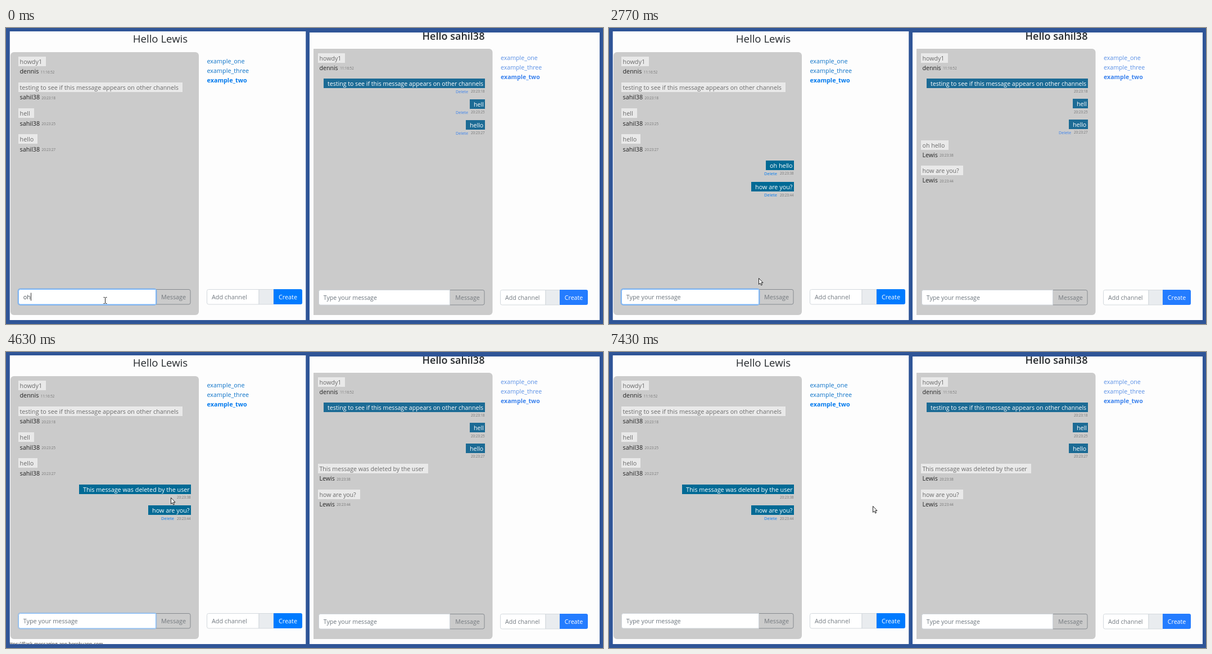
These frames come from a looping animation (1062x527 px, 7560 ms). An HTML page with a canvas:

```html
<!DOCTYPE html>
<html lang="en">
<head>
<meta charset="utf-8">
<title>Two chat windows</title>
<style>
html, body { margin: 0; width: 100%; height: 100%; overflow: hidden; background: #2f5597; }
canvas { display: block; }
</style>
</head>
<body>
<canvas id="stage" width="1062" height="527"></canvas>
<script>
const ctx = document.getElementById('stage').getContext('2d');
const LOOP = 7560, BLINK = 210;
const SENT_1 = 620, SENT_2 = 2560, BLUR = 4540, DELETED = 4600;
const LEFT_USER = 'Lewis', RIGHT_USER = 'sahil38';
const REMOVED = 'This message was deleted by the user';

const left = {
  user: LEFT_USER, page: [6.5, 6, 527, 514], panel: [8, 43, 335, 468], corners: 6,
  title: [274.5, 25.5, 18.6, 500], size: 10.8, small: 7.6,
  x: 22, right: 329, top: 59.5, steps: [46.3, 38.2, 37.6], nameDy: 17.4, metaDy: 14.3,
  own: '#006a95', link: '#0b72c8', strong: '#0079ee',
  links: [357.5, 59, 17.1], input: [22, 267], inputY: 465, channel: [357, 450, 476, 527],
};
const right = {
  user: RIGHT_USER, page: [540, 8, 516, 512], panel: [547, 37, 318.5, 474], corners: [0, 6, 6, 0],
  title: [796, 21, 18, 600], size: 10.6, small: 7.3,
  x: 555, right: 852, top: 53.5, steps: [45.5, 37, 36.4], nameDy: 17, metaDy: 14,
  own: '#1c6b95', link: '#5a90e6', strong: '#3a82ee',
  links: [880, 53, 16.8], input: [556, 790], inputY: 466, channel: [879, 960, 985, 1035],
};

// Each key press: [time, field content]
const keys = [[-100, 'oh']];
function type(start, step, added, before) {
  [...added].forEach((_, i) => keys.push([start + i * step, before + added.slice(0, i + 1)]));
}
type(40, 80, ' hello', 'oh');
keys.push([SENT_1, '']);
type(1000, 80, 'how are', '');
type(1700, 90, ' you', 'how are');
keys.push([2340, 'how are you?'], [SENT_2, '']);

// Pointer stops: [time, x, y]
const stops = [[2650, 176, 485], [3170, 830, 192], [3400, 815, 186], [4000, 800, 190],
  [4450, 287, 256], [4630, 293, 259], [5300, 293, 259], [6070, 544, 210], [6600, 469, 274]];

function text(str, x, y, size, color, weight = 400, align = 'left') {
  ctx.font = `${weight} ${size}px "Open Sans", "Noto Sans", sans-serif`;
  ctx.textAlign = align;
  ctx.fillStyle = color;
  ctx.fillText(str, x, y);
  return ctx.measureText(str).width;
}

function box(x, y, w, h, fill, stroke, radius = 0, lineWidth = 1) {
  ctx.beginPath();
  ctx.roundRect(x, y, w, h, radius);
  if (fill) { ctx.fillStyle = fill; ctx.fill(); }
  if (stroke) { ctx.strokeStyle = stroke; ctx.lineWidth = lineWidth; ctx.stroke(); }
}

function bubble(v, message, center, own) {
  ctx.font = `400 ${v.size}px "Open Sans", "Noto Sans", sans-serif`;
  const w = Math.round(ctx.measureText(message).width + 9.5);
  const x = own ? v.right - w : v.x, y = Math.floor(center - 8.5);
  box(x, y, w, 17, own ? v.own : '#e9e9e9');
  text(message, x + (own ? 7 : 2.5), y + 12.5, v.size, own ? '#fff' : '#6a6a6a');
}

function messages(t) {
  const list = [
    ['dennis', 'howdy1', '11:16:52'],
    [RIGHT_USER, 'testing to see if this message appears on other channels', '20:23:18', SENT_1 + 60],
    [RIGHT_USER, 'hell', '20:23:25', SENT_2 + 60],
    [RIGHT_USER, 'hello', '20:23:27', DELETED],
  ];
  if (t >= SENT_1) list.push([LEFT_USER, t < DELETED ? 'oh hello' : REMOVED, '20:23:38', DELETED]);
  if (t >= SENT_2) list.push([LEFT_USER, 'how are you?', '20:23:44', Infinity]);
  return list;
}

function chat(v, t) {
  let y = v.top;
  for (const [user, message, time, lockedAt] of messages(t)) {
    const own = user === v.user;
    bubble(v, message, y, own);
    if (own) {
      const base = y + v.metaDy + 2.4, open = t < lockedAt;
      text(time, v.right - .5, base, 6.2, '#777', 400, 'right');
      if (open) text('Delete', v.right - 30, base + .3, v.small, v.strong, 400, 'right');
      y += v.steps[open ? 1 : 2];
    } else {
      const w = text(user, v.x + 2.5, y + v.nameDy + 4, v.size, '#222');
      text(time, v.x + w + 6, y + v.nameDy + 3.6, 6.2, '#777');
      y += v.steps[0];
    }
  }
}

function form(v, t) {
  const [x0, x1] = v.input, y = v.inputY + .5, base = y + 17.5, h = 26.5;
  const focus = v === left ? Math.max(0, Math.min(1, 1 - (t - BLUR) / 150)) : 0;
  box(x1 - .5, y, v.right - x1 - .5, h, null, '#858a8f', [0, 3, 3, 0]);
  text('Message', (x1 + v.right) / 2, base, v.size, '#73787d', 400, 'center');
  if (focus) box(x0 - .5, y - 1, x1 - x0 + 1, h + 2, null, `rgba(110,170,240,${.75 * focus})`, 4, 2);
  box(x0 + .5, y, x1 - x0 - 1, h, '#fff', focus ? '#80bdff' : '#ced4da', [3, 0, 0, 3]);

  const [pressed, value] = v === left ? keys.findLast(k => k[0] <= t) : [0, ''];
  const w = text(value || 'Type your message', x0 + 8.8, base, v.size, value ? '#495057' : '#6c757d');
  if (v === left && t < BLUR && Math.floor((t - pressed) / BLINK) % 2 === 0) {
    ctx.fillStyle = '#333';
    ctx.fillRect(Math.round(x0 + 8.8 + (value ? w : 0)), y + 6, 1, 14);
  }

  const [a, b, c, d] = v.channel;
  box(a + .5, y, b - a - .5, h, '#fff', '#d3d8dd', [3, 0, 0, 3]);
  box(b, y, c - b, h, '#e9ecef', '#d3d8dd');
  box(c, y - .5, d - c, 27, v === left ? '#007bff' : '#247cff', null, [0, 3, 3, 0]);
  text('Add channel', a + 9, base, v.size, '#747b82');
  text('Create', (c + d) / 2, base, v.size, '#fff', 400, 'center');
}

function drawWindow(v, t) {
  ctx.save();
  ctx.beginPath();
  ctx.rect(...v.page);
  ctx.clip();
  box(...v.page, '#fdfdfd');
  const [tx, ty, size, weight] = v.title;
  text('Hello ' + v.user, tx, ty, size, '#24282c', weight, 'center');
  box(...v.panel, '#cbcbcb', null, v.corners);
  const [lx, ly, gap] = v.links;
  ['example_one', 'example_three', 'example_two'].forEach((name, i) =>
    text(name, lx, ly + i * gap + 4, v.size, i < 2 ? v.link : v.strong, i < 2 ? 400 : 700));
  chat(v, t);
  form(v, t);
  if (v === left && t >= 4400 && t < 5100) {
    text('https://flask-messaging-app.herokuapp.com', 1, 522.5, 8.35, '#333');
  }
  ctx.restore();
}

function pointerAt(t) {
  const i = stops.findIndex(s => s[0] > t);
  if (i < 1) return (i ? stops.at(-1) : stops[0]).slice(1);
  const [t0, x0, y0] = stops[i - 1], [t1, x1, y1] = stops[i];
  const p = (t - t0) / (t1 - t0), e = p * p * (3 - 2 * p);
  return [x0 + (x1 - x0) * e, y0 + (y1 - y0) * e];
}

function pointer(t) {
  const [x, y] = pointerAt(t);
  ctx.save();
  ctx.translate(Math.round(x), Math.round(y));
  ctx.lineWidth = 1;
  ctx.strokeStyle = '#222';
  ctx.fillStyle = '#fff';
  if (x > 22 && x < 267 && y > 465) {
    ctx.stroke(new Path2D('M-2.5-5.5H-.5L.5-4.5L1.5-5.5H3.5M.5-5V5M-2.5 5.5H-.5L.5 4.5L1.5 5.5H3.5'));
  } else if (x > 533 && x < 547) {
    const arrows = new Path2D('M-.5-3.5L-3 0L-.5 3.5ZM1.5-3.5L4 0L1.5 3.5Z');
    ctx.fill(arrows);
    ctx.stroke(arrows);
  } else {
    const arrow = new Path2D('M.5.5V11.5L3 9.2L4.7 13L6.5 12.2L4.8 8.5H8Z');
    ctx.fill(arrow);
    ctx.stroke(arrow);
  }
  ctx.restore();
}

function frame() {
  const t = performance.now() % LOOP;
  box(0, 0, 1062, 527, '#2f5597');
  drawWindow(left, t);
  drawWindow(right, t);
  pointer(t);
  requestAnimationFrame(frame);
}
frame();
</script>
</body>
</html>
```
